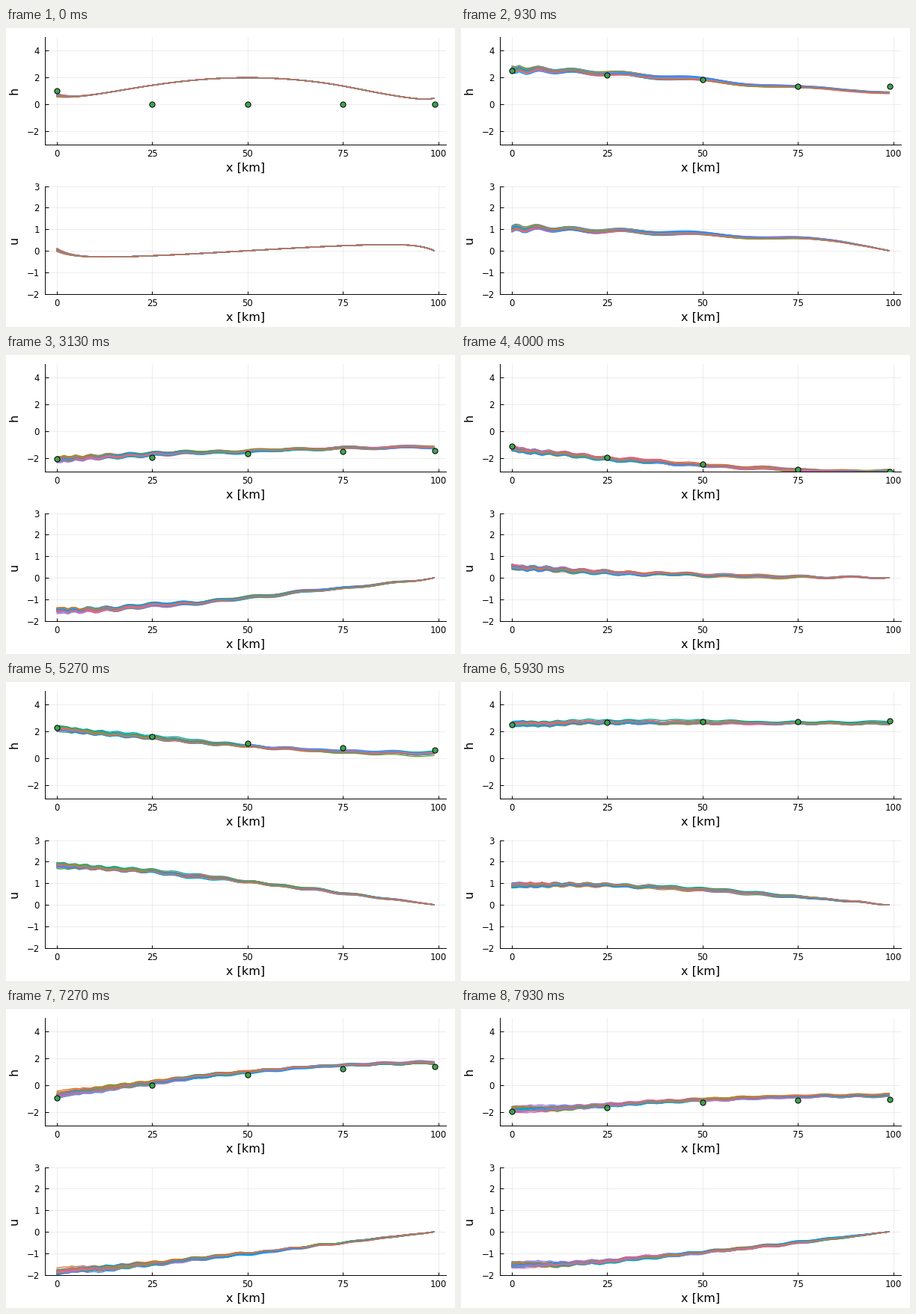
Write a matplotlib script that moves like this. It is 600 px wide and 400 px high and loops after 8 s.

```python
import numpy as np
import matplotlib.pyplot as plt
from matplotlib.animation import FuncAnimation
from matplotlib.collections import LineCollection

W, H, DPI = 600, 400, 100
FRAMES, LOOP_MS = 120, 8000
N, MEMBERS = 100, 50
STATIONS = [0, 25, 50, 75, 99]
PALETTE = ("#009AFA #E36F47 #3EA44E #C371D2 #AC8E18 #00AAAE #ED5E93 #C68225 "
           "#00A98D #8E971E #00A9CC #9B7FE9 #618DF6 #F06073 #DD65B6 #6C9F33").split()
PX = 72 / DPI
HAIR = 0.97 * PX

x = np.arange(N)


def tide(k):
    """Level at the open end: lunar tide and its overtide, with a short spin-up."""
    a = 2 * np.pi * k / 74.5
    level = 0.13 + 2.355 * np.cos(a - 0.961) + 0.1 * np.sin(2 * a)
    return level * (1 - 0.55 * np.exp(-k / 3))


def step_matrices(g=9.81, depth=20.0, fric=1 / (0.06 * 86400), dx=1000.0, dt=600.0):
    """Crank-Nicolson step of a shallow channel: tide at the left, wall at the right."""
    a = np.zeros((2 * N, 2 * N))
    for i in range(1, N):
        a[i, N + i], a[i, N + i - 1] = -depth / dx, depth / dx
    for i in range(N - 1):
        a[N + i, i + 1], a[N + i, i] = -g / dx, g / dx
        a[N + i, N + i] = -fric
    eye = np.eye(2 * N)
    inv = np.linalg.inv(eye - dt / 2 * a)
    keep = eye + dt / 2 * a
    keep[0] = 0
    return inv @ keep, inv[:, 0]


def simulate():
    step, inflow = step_matrices()
    rng = np.random.default_rng(11)

    # The observed water starts at rest and runs one step ahead of the estimate.
    truth = np.zeros((FRAMES + 1, 2 * N))
    truth[0, 0] = tide(0)
    for k in range(1, FRAMES + 1):
        truth[k] = step @ truth[k - 1] + inflow * tide(k)

    # The ensemble mean starts from a bump and is pulled towards the observed water.
    h0 = (1.95 * np.sin(np.pi * x / 100) + 0.65 * np.exp(-x / 5.4)
          + 0.38 * np.exp((x - 99) / 3) - 0.1 * np.exp(-((x - 84) / 10) ** 2))
    u0 = -0.33 * np.cos(np.pi * x / 100) + 0.38 * np.exp(-x / 4) - 0.33 * np.exp((x - 99) / 4)
    mean = np.zeros((FRAMES, 2 * N))
    mean[0] = np.r_[h0, u0]
    for k in range(1, FRAMES):
        mean[k] = step @ mean[k - 1] + inflow * (tide(k) + rng.normal(0, 0.04))
        mean[k] += 0.1 * (truth[k] - mean[k])

    # Each member carries its own AR(1) disturbance of the tide.
    spread = np.zeros((FRAMES, 2 * N, MEMBERS))
    state, force = np.zeros((2 * N, MEMBERS)), np.zeros(MEMBERS)
    for k in range(FRAMES):
        kick = rng.normal(0, 0.06, MEMBERS)
        force = 0.8 * force + kick - kick.mean()
        state = 0.95 * (step @ state) + np.outer(inflow, force)
        spread[k] = state
    return truth[1:, STATIONS], mean[:, :, None] + spread


obs, members = simulate()

plt.rcParams["font.family"] = "DejaVu Sans"
fig = plt.figure(figsize=(W / DPI, H / DPI), dpi=DPI, facecolor="white")
LEFT, WIDE, TALL = 52.4, 535.3, 144


def label(px, py, text, size, **kw):
    fig.text(px / W, 1 - py / H, text, fontsize=size * PX, **{"ha": "center", "va": "center", **kw})


def panel(top, name, lo, hi, ticks):
    ax = fig.add_axes([LEFT / W, 1 - (top + TALL) / H, WIDE / W, TALL / H])
    ax.set(xlim=(-2.97, 101.97), ylim=(lo, hi), xticks=range(0, 101, 25), yticks=ticks)
    ax.spines[["top", "right"]].set_visible(False)
    ax.spines[["left", "bottom"]].set_linewidth(HAIR)
    ax.tick_params(direction="in", length=4.5 * PX, width=HAIR, labelbottom=False, labelleft=False)
    ax.set_axisbelow(True)
    ax.grid(color="black", alpha=0.1, linewidth=0.7 * PX)
    for v in range(0, 101, 25):
        label(LEFT + (v + 2.97) / 104.94 * WIDE, top + 155.5, str(v), 11.6, va="center_baseline")
    for v in ticks:
        label(44.7, top + TALL * (hi - v) / (hi - lo), str(v).replace("-", "\u2212"), 11.6,
              ha="right", va="center_baseline")
    label(320.5, top + 175.2, "x [km]", 16)
    label(11, top + 72, name, 16, rotation=90)
    colors = [PALETTE[i % len(PALETTE)] for i in range(MEMBERS)]
    lines = LineCollection([], colors=colors, linewidths=1.3 * PX, zorder=3)
    return ax, ax.add_collection(lines, autolim=False)


ax_h, h_lines = panel(11.6, "h", -3, 5, range(-2, 5, 2))
ax_u, u_lines = panel(211.6, "u", -2, 3, range(-2, 4))
dots, = ax_h.plot(STATIONS, obs[0], "o", ms=7.2 * PX, mfc="#3EA44E", mec="black", mew=PX, zorder=4)


def bundle(values):
    return [np.column_stack([x, v]) for v in values.T]


def update(k):
    h_lines.set_segments(bundle(members[k, :N]))
    u_lines.set_segments(bundle(members[k, N:]))
    dots.set_ydata(obs[k])
    return h_lines, u_lines, dots


anim = FuncAnimation(fig, update, frames=FRAMES, interval=LOOP_MS / FRAMES,
                     init_func=lambda: update(0), repeat=True, repeat_delay=0, blit=False)
plt.show()
```
